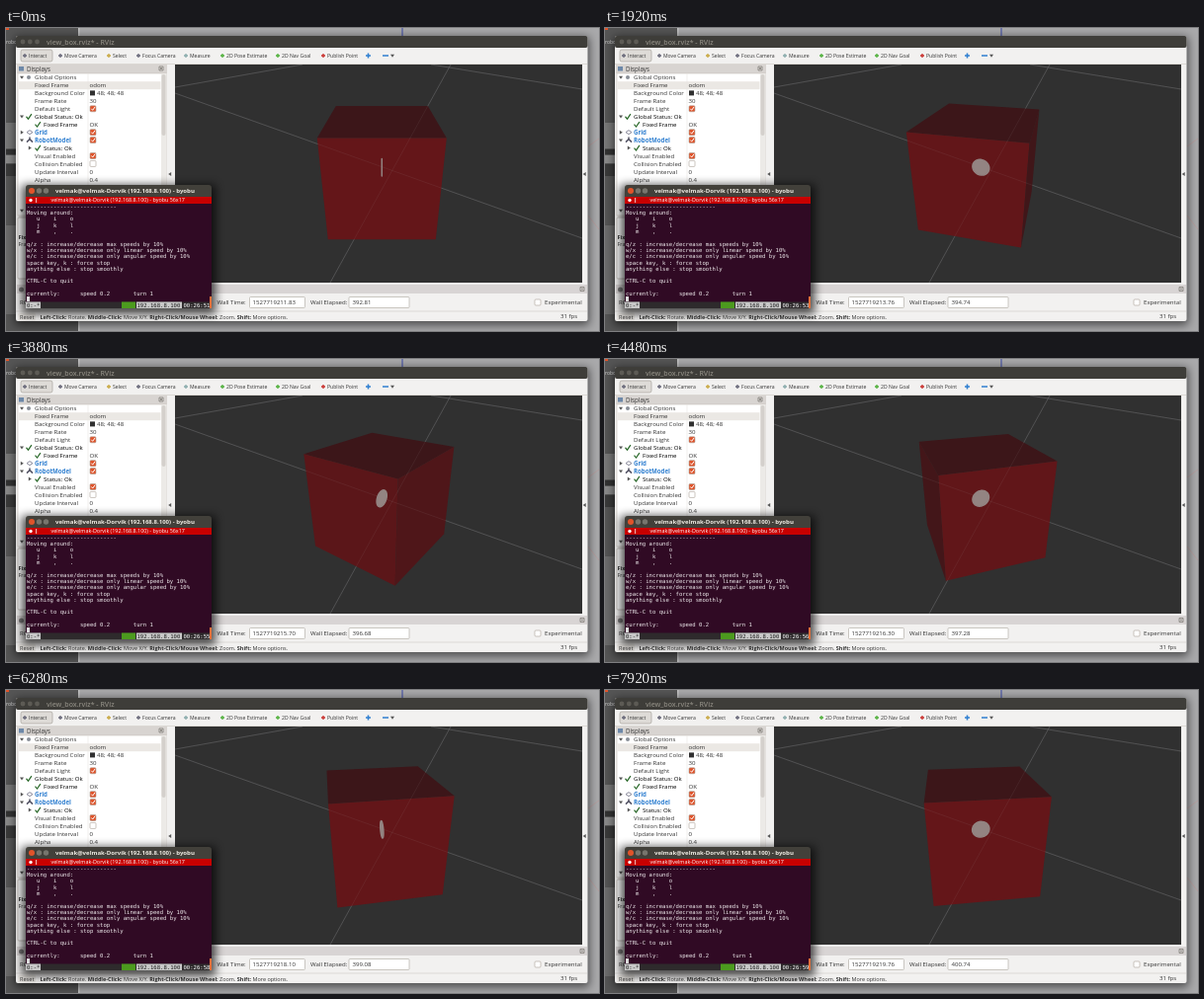
An HTML page that plays this animation: 600 by 307 pixels, repeating every 8 s.

```html
<!DOCTYPE html>
<html lang="en">
<head>
<meta charset="utf-8">
<title>Rotating box</title>
<style>
html, body { margin: 0; width: 100%; height: 100%; overflow: hidden; background: #4c4c4c; }
svg { display: block; }
#stage { width: 100vw; height: 100vh; }
text { white-space: pre; font-family: "Open Sans", "Noto Sans", sans-serif; }
.mono { font-family: "DejaVu Sans Mono", "Noto Sans Mono", monospace; }
.shadow { filter: blur(5px); }
</style>
</head>
<body>
<svg id="stage" viewBox="0 0 600 307" preserveAspectRatio="none"></svg>
<script>
const stage = document.getElementById('stage');
const INK = '#333', PANEL = '#f2f1f0', BLUE = '#2f7fd0', ORANGE = '#e0532a';

const rect = (x, y, w, h, fill, more = '') =>
  `<rect x="${x}" y="${y}" width="${w}" height="${h}" fill="${fill}" ${more}/>`;
const dot = (x, y, r, fill) => `<circle cx="${x}" cy="${y}" r="${r}" fill="${fill}"/>`;
const line = (d, color, w = 1) => `<path d="${d}" fill="none" stroke="${color}" stroke-width="${w}"/>`;
const text = (x, y, str, size = 6.2, fill = INK, more = '') =>
  `<text x="${x}" y="${y}" font-size="${size}" fill="${fill}" ${more}>${str}</text>`;
const BOLD = 'font-weight="700"', MONO = 'class="mono"';
const box = (x, y, w, h) => rect(x, y, w, h, '#fff', 'rx="1" stroke="#b5b0aa" stroke-width=".7"');
const check = (x, y, on = true) =>
  rect(x - 3, y - 3, 6, 6, on ? ORANGE : '#fff', 'rx="1" stroke="#a99f96" stroke-width=".6"') +
  (on ? line(`M${x - 1.6} ${y}l1.3 1.5 2.4-3.4`, '#fff', 1) : '');
const tick = (x, y) => line(`M${x - 2.5} ${y}l2 2.4 3.4-5`, '#2c6a2c', 1.2);
const arrow = (x, y, open) =>
  `<path d="${open ? `M${x - 2} ${y - 1.2}h4l-2 3z` : `M${x - 1.2} ${y - 2}v4l3-2z`}" fill="#555"/>`;
const backArrow = (x, y) => `<path d="M${x + 1.2} ${y - 2}v4l-3-2z" fill="#555"/>`;

// Perspective camera looking down at the box centre
const SIN = .4425, COS = .897, DIST = 2.86, FOCAL = 287, CX = 380.3, CY = 141.3;
const project = (x, y, z) => {
  const k = FOCAL / (DIST - y * SIN - z * COS);
  return [(CX + k * x).toFixed(2), (CY - k * (y * COS - z * SIN)).toFixed(2)];
};
const poly = pts => pts.map(p => p.join(',')).join(' ');

function desktop() {
  return rect(0, 0, 600, 307, '#a9a9ab') + rect(0, 0, 73, 307, '#555') +
    rect(73, 0, 1.5, 307, '#c4c4c4') + rect(0, 0, 3, 2, ORANGE) +
    text(0, 16, 'robo', 5, '#ddd') +
    rect(0, 96, 10, 26, '#777') + rect(0, 123, 10, 5, '#333') + rect(0, 129, 10, 8, '#8a8a8a') +
    rect(0, 138, 10, 12, '#3a3a3a') + rect(0, 200, 10, 90, '#6c6c6c') +
    line('M401 0V8', '#3a48a8', 1) + line('M589 120l11-8M589 190l11 14', '#bb9a9a', .7) +
    rect(9, 9, 581, 292, '#000', 'opacity=".55" class="shadow"');
}

function mainWindow() {
  let s = rect(10, 8, 578.5, 289, PANEL, 'rx="2"') + rect(10, 8, 578.5, 12, '#3e3d39', 'rx="2"') +
    [17, 24.3, 31.5].map(x => dot(x, 14, 2.4, '#5d5b55')).join('') +
    text(41, 16.6, 'view_box.rviz* - RViz', 7, '#8a877f', 'font-weight="600"');

  s += rect(15, 22, 32, 12, '#dedbd7', 'rx="2" stroke="#aaa59e" stroke-width=".7"');
  const tools = [[23, 'Interact', '#667'], [59, 'Move Camera', '#667'], [108, 'Select', '#c8a840'],
    [138, 'Focus Camera', '#667'], [186, 'Measure', '#8aa'], [223, '2D Pose Estimate', '#4fb03a'],
    [279, '2D Nav Goal', '#4fb03a'], [325, 'Publish Point', '#c9302c']];
  for (const [x, label, color] of tools) {
    s += text(x, 30, label, 5.1) + line(`M${x - 6} 28h4M${x - 4} 26v4`, color, 1.3);
  }
  s += line('M364 28h5M366.5 25.500v5M381 28h6', BLUE, 1.6) + arrow(391, 28, true) +
    line('M10 36.500H588', '#d2cec9', .7);

  s += rect(11, 37, 152, 9, '#d8d4d1') + rect(13, 39, 5, 4.500, '#6d88a8') + text(21, 43.500, 'Displays') +
    line('M155 39h4v4h-4zM156 40l2 2m0-2l-2 2', '#77736d', .7) +
    rect(12, 46, 150, 144, '#fff', 'stroke="#c5c0ba" stroke-width=".6"') +
    rect(12.500, 54.200, 144, 8, '#ebe8e4') + line('M83 46V190', '#e8e5e1', .6) +
    rect(157, 46, 5, 144, '#eceae7') + rect(157.500, 47, 4, 62, '#d4d0cc', 'rx="2"');

  // label, indent, value, mark (open arrow, colour, status tick or display icon)
  const rows = [['Global Options', 29, '', 'o'], ['Fixed Frame', 29, 'odom'],
    ['Background Color', 29, '48; 48; 48', 'c'], ['Frame Rate', 29, '30'], ['Default Light', 29, true],
    ['Global Status: Ok', 29, '', 't'], ['Fixed Frame', 38, 'OK', 't'], ['Grid', 29, true, 'g'],
    ['RobotModel', 29, true, 'r'], ['Status: Ok', 38, '', 's'], ['Visual Enabled', 29, true],
    ['Collision Enabled', 29, false], ['Update Interval', 29, '0'], ['Alpha', 29, '0.4']];
  rows.forEach(([label, x, value, mark], i) => {
    const y = 50 + i * 7.950, display = mark === 'g' || mark === 'r', status = mark === 't' || mark === 's';
    s += text(x, y + 2.300, label, 6.100, display ? BLUE : status ? '#000' : INK, display ? BOLD : '');
    if (typeof value === 'boolean') s += check(88, y, value);
    else s += text(mark === 'c' ? 92 : 84.500, y + 2.300, value, 6.100);
    if (mark === 'c') s += rect(85, y - 2.500, 5, 5, '#303030');
    if (status) s += tick(x - 6, y);
    if (mark === 's') s += arrow(24, y);
    else if (mark && mark !== 'c' && x === 29) s += arrow(16, y, mark !== 'g');
    if (mark === 'o') s += dot(23, y, 2, '#8a8f98');
    if (mark === 'g') s += line(`M21 ${y}l3-2 3 2-3 2z`, '#889', 1);
    if (mark === 'r') s += line(`M24 ${y - 3}v3M21 ${y + 2}l3-3 3 3`, '#556', 1.5);
  });
  s += arrow(16, 185, true) + box(12, 192, 150, 62) + text(12.500, 214, 'Fixed', 5.500, INK, BOLD) +
    text(12.500, 221, 'Frame', 5.500);

  s += backArrow(166, 148) + backArrow(585.5, 148) +
    rect(11, 260, 577, 9, '#d8d4d4') + dot(15.500, 265, 2.500, '#777') +
    line('M581 262.500h4v4h-4zM582 263.500l2 2m0-2l-2 2', '#77736d', .7) +
    text(14, 280, 'ROS', 6) + text(213.500, 280, 'Wall Time:', 6.100) + box(246.500, 272.500, 56, 11) +
    text(308, 280, 'Wall Elapsed:', 6.100) + box(347, 272.500, 61, 11) +
    `<text id="wall" x="249.500" y="280" font-size="6.100" fill="${INK}"></text>` +
    `<text id="elapsed" x="350.500" y="280" font-size="6.100" fill="${INK}"></text>` +
    check(538, 278, false) + text(545, 280, 'Experimental', 6.100);

  const b = str => `<tspan font-weight="700">${str}</tspan>`;
  return s + line('M10 287H588', '#d2cec9', .7) +
    rect(12, 288.500, 18, 8, '#e8e5e1', 'rx="1.500"') +
    text(14, 294.800, 'Reset', 5.600) +
    text(34.500, 294.800, `${b('Left-Click:')} Rotate. ${b('Middle-Click:')} Move X/Y. ` +
      `${b('Right-Click/Mouse Wheel:')} Zoom. ${b('Shift:')} More options.`, 5.480) +
    text(561, 293.500, '31 fps', 6.100);
}

function view() {
  const grid = 'M450 37L328 258M171 66L583 213M171 60L300 37M430 37L583 62';
  return `<svg x="171" y="37" width="412" height="221" viewBox="171 37 412 221">` +
    rect(171, 37, 412, 221, '#303030') + line(grid, '#555556', .7) +
    '<g id="faces"></g>' + `<g opacity=".12">${line(grid, '#aaa', .7)}</g>` +
    '<polygon id="wheel" fill="#938482" stroke="#938482" stroke-width="1.500" stroke-linejoin="round"/></svg>';
}

function terminal() {
  const title = 'velmak@velmak-Dorvik (192.168.8.100) - byobu';
  const lines = ['---------------------------', 'Moving around:', '   u    i    o', '   j    k    l',
    '   m    ,    .', '', 'q/z : increase/decrease max speeds by 10%',
    'w/x : increase/decrease only linear speed by 10%',
    'e/c : increase/decrease only angular speed by 10%', 'space key, k : force stop',
    'anything else : stop smoothly', '', 'CTRL-C to quit', '',
    'currently:      speed 0.2       turn 1'];
  let s = rect(16, 159, 196, 131, '#000', 'opacity=".7" class="shadow"') +
    rect(20, 159, 188, 20, '#42403a', 'rx="3"') +
    dot(26, 165, 3, ORANGE) + dot(33.500, 165, 2.700, '#77756d') + dot(40.500, 165, 2.700, '#77756d') +
    text(50, 167.300, title, 6.050, '#eeeae2', BOLD) +
    rect(20, 171, 188, 7, '#c80000') + dot(25, 174.500, 1.700, '#fff') +
    line('M30.500 172v5', '#fff', .7) + text(45.500, 176.300, title + ' 56x17', 5.400, '#fff') +
    rect(20, 178, 188, 106, '#300a24');
  lines.forEach((str, i) => { s += text(21, 182.800 + i * 6.300, str, 5.600, '#f0ecee', MONO); });
  return s + rect(21, 272, 3, 5, '#ddd') + rect(20, 277.500, 188, 6.500, '#2e2a2c') +
    rect(20, 277.500, 15, 6.500, '#c8c8c8') + text(21, 282.800, '0:-*', 5.600, '#222', MONO) +
    rect(117, 277.500, 14, 6.500, '#4c9a1e') + rect(132, 277.500, 46, 6.500, '#c8c8c8') +
    text(132.500, 282.800, '192.168.8.100', 5.600, '#222', MONO) +
    `<text id="clock" class="mono" x="179.500" y="282.800" font-size="5.600" fill="#fff"></text>` +
    rect(206, 272, 2, 12, '#e8703a');
}

stage.innerHTML = desktop() + mainWindow() + view() + terminal();
const el = id => document.getElementById(id);
const [faces, wheel, wall, elapsed, clock] = ['faces', 'wheel', 'wall', 'elapsed', 'clock'].map(el);

// Heading of the box in degrees, by seconds
const HEADING = [[0, 0], [1.067, -59], [1.933, -104.5], [3.2, -176.5], [4.467, -251], [6.267, -349.5], [8, -446]];
function heading(t) {
  const i = Math.max(1, HEADING.findIndex(k => k[0] >= t));
  const [t0, a0] = HEADING[i - 1], [t1, a1] = HEADING[i];
  return a0 + (a1 - a0) * (t - t0) / (t1 - t0);
}

function drawBox(deg) {
  const rad = Math.PI / 180;
  const corner = (a, y) => project(Math.SQRT1_2 * Math.sin(a * rad), y, Math.SQRT1_2 * Math.cos(a * rad));
  const face = (pts, red) =>
    `<polygon points="${poly(pts)}" fill="rgb(${Math.round(red)},21,24)" fill-opacity=".96"/>`;
  let s = face([45, 135, 225, 315].map(a => corner(deg + a, .5)), 61);
  for (let k = 0; k < 4; k++) {
    const a = deg + 90 * k, facing = Math.cos(a * rad);
    if (facing > .195) {
      s += face([corner(a - 45, .5), corner(a + 45, .5), corner(a + 45, -.5), corner(a - 45, -.5)], 52 + 50 * facing);
    }
  }
  faces.innerHTML = s;

  const rim = [], r = .087, sin = Math.sin(deg * rad), cos = Math.cos(deg * rad);
  for (let p = 0; p < 360; p += 10) {
    const h = r * Math.cos(p * rad);
    rim.push(project(h * sin, r * Math.sin(p * rad), h * cos));
  }
  wheel.setAttribute('points', poly(rim));
}

function frame(now) {
  const ms = now % 8000, part = ms % 200;
  // 15 steps a second, shown on a 40 ms raster
  const t = (ms - part + (part < 80 ? 0 : part < 120 ? 200 / 3 : 400 / 3)) / 1000;
  drawBox(heading(t));
  wall.textContent = (1527719211.83 + t).toFixed(2);
  elapsed.textContent = (392.81 + t).toFixed(2);
  clock.textContent = '00:26:' + (51 + Math.floor(t + .77));
  requestAnimationFrame(() => frame(performance.now() - start));
}
const start = performance.now();
frame(0);
</script>
</body>
</html>
```
